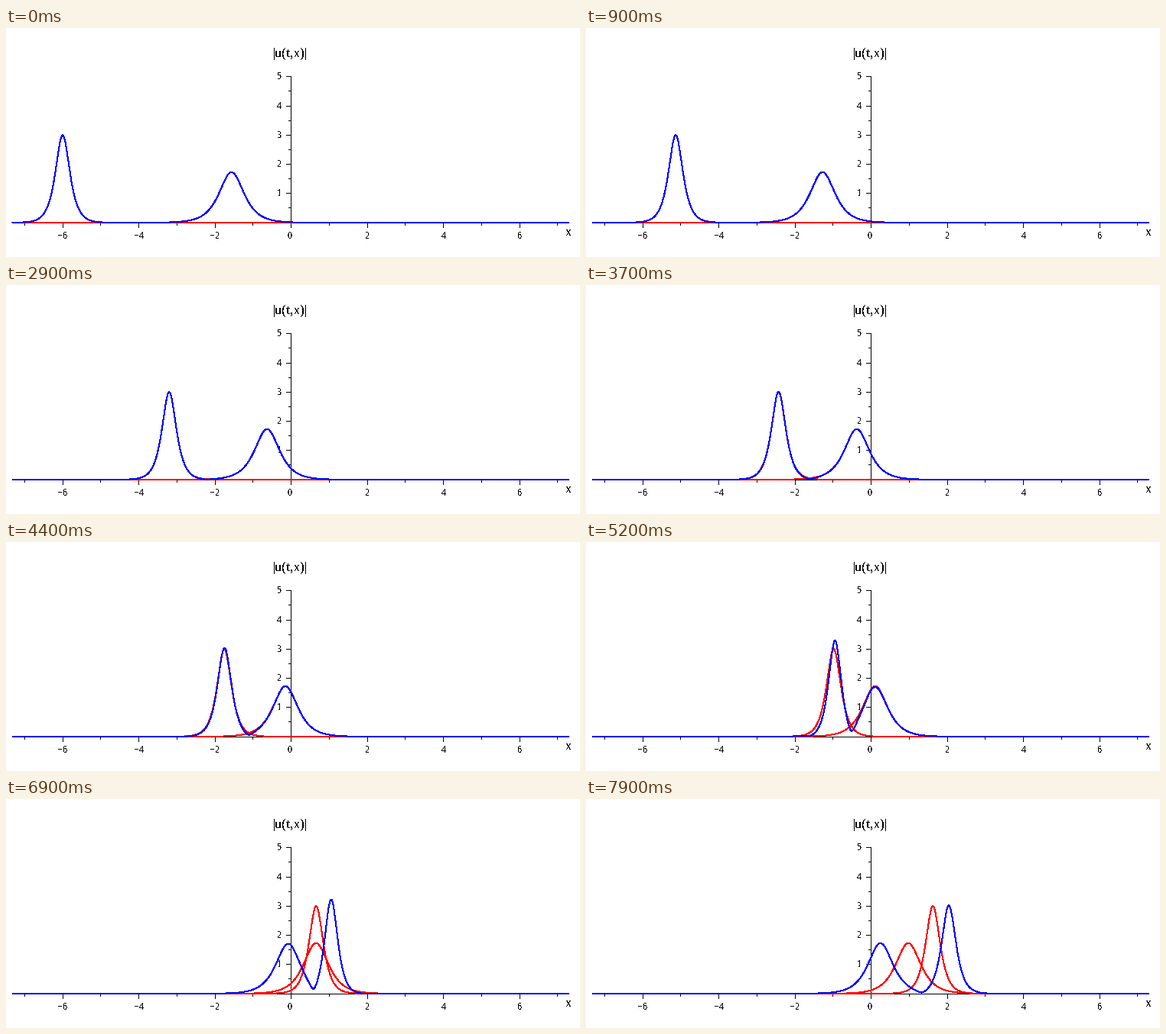
Recreate the animation shown at these times as a matplotlib script. Size 750 px wide and 300 px high, loop 8000 ms.

```python
import numpy as np
import matplotlib.pyplot as plt
from matplotlib.animation import FuncAnimation

W, H, DPI = 750, 300, 100
PX = 72 / DPI                     # one pixel in points
X0, Y0 = 372.5, 255.0             # pixel position of the plot's zero point
SX, SY = 49.75, 38.25             # pixels per unit
FRAMES, INTERVAL = 80, 100
MID = 60                          # step at which the solitons collide

# Two Sasa-Satsuma solitons: speed k^2, height k/2, incoming phase PHASE
K1, K2 = 6.0, np.sqrt(12)
PHASE = 0.85 * np.pi
R = (K1 - K2) / (K1 + K2)
GAMMA = np.cos(np.arctan(R * np.tan(np.pi - PHASE)))
LEAD = -np.log(R)
LAG = np.log(1 - (1 - R * R) * GAMMA ** 2) / 2
OFFSET, SHIFT = (LEAD + LAG) / 2, (LEAD - LAG) / 2
DT = (6 - SHIFT / K1) / K1 ** 2 / MID      # the fast one starts at x = -6

plt.rcParams.update({
    "font.family": "Liberation Serif",
    "text.antialiased": False,
    "text.hinting": "native",
    "text.hinting_factor": 1,
})


def px(x):
    return X0 + SX * x


def py(u):
    return Y0 - SY * u


def theta(k, x, t):
    return k * (x - k * k * t)


def soliton(k, x, t, shift):
    return k / 2 / np.cosh(theta(k, x, t) + shift)


def pair(x, t):
    a, b = (theta(k, x, t) + OFFSET for k in (K1, K2))
    s, d = (a + b) / 2, (a - b) / 2
    m1, m2 = np.cosh(a) / K1, np.cosh(b) / K2
    m12 = (np.exp(s) + GAMMA * np.exp(-s)) / (K1 + K2)
    p, q = m2 - m12 * np.exp(-d), m1 - m12 * np.exp(d)
    size = np.sqrt(p * p + q * q + 2 * GAMMA * p * q)
    return size / (m1 * m2 - m12 ** 2) / 2


fig = plt.figure(figsize=(W / DPI, H / DPI), dpi=DPI, facecolor="white")
ax = fig.add_axes([0, 0, 1, 1])
ax.set_xlim(0, W)
ax.set_ylim(H, 0)
ax.axis("off")


def rule(x1, y1, x2, y2):
    ax.plot([x1, x2], [y1, y2], color="black", lw=PX, snap=False, zorder=1,
            solid_capstyle="butt")


def label(x, y, text, size):
    ax.text(x, y, text, fontsize=size * PX, ha="center", va="baseline", zorder=2)


# Axes, ticks and labels
rule(8, 255.5, 736, 255.5)
rule(X0, 63, X0, 256)
for n in range(-7, 8):
    col = np.floor(px(n)) + 0.5
    rule(col, 255, col, 259 if n % 2 else 262)
    if n % 2 == 0:
        text = str(n).replace("-", "\u2212")
        label(px(n) - (1.5 if n == 0 else 0), 276, text, 12)
for n in range(1, 11):
    row = np.floor(py(n / 2)) + 0.5
    rule(369 if n % 2 else 366, row, 372, row)
    if n % 2 == 0:
        label(357, row + 3.5, str(n // 2), 12)
label(371.5, 38, "|u(t,x)|", 18)
label(735, 272, "x", 18)

# Curves; without antialiasing a one-pixel stroke fills two pixels
xs = np.linspace((8 - X0) / SX, (736 - X0) / SX, 1457)


def curve(color, z):
    return ax.plot(px(xs), py(0 * xs), color=color, lw=PX, aa=False, snap=False,
                   zorder=z, solid_capstyle="butt")[0]


fast, slow, both = curve("#ff0000", 3), curve("#ff0000", 3), curve("#0000ff", 4)


def draw(i):
    t = (i - MID) * DT
    fast.set_ydata(py(soliton(K1, xs, t, SHIFT)))
    slow.set_ydata(py(soliton(K2, xs, t, -SHIFT)))
    both.set_ydata(py(pair(xs, t)))
    return fast, slow, both


anim = FuncAnimation(fig, draw, frames=FRAMES, interval=INTERVAL,
                     repeat=True, repeat_delay=0, blit=False)
plt.show()
```
